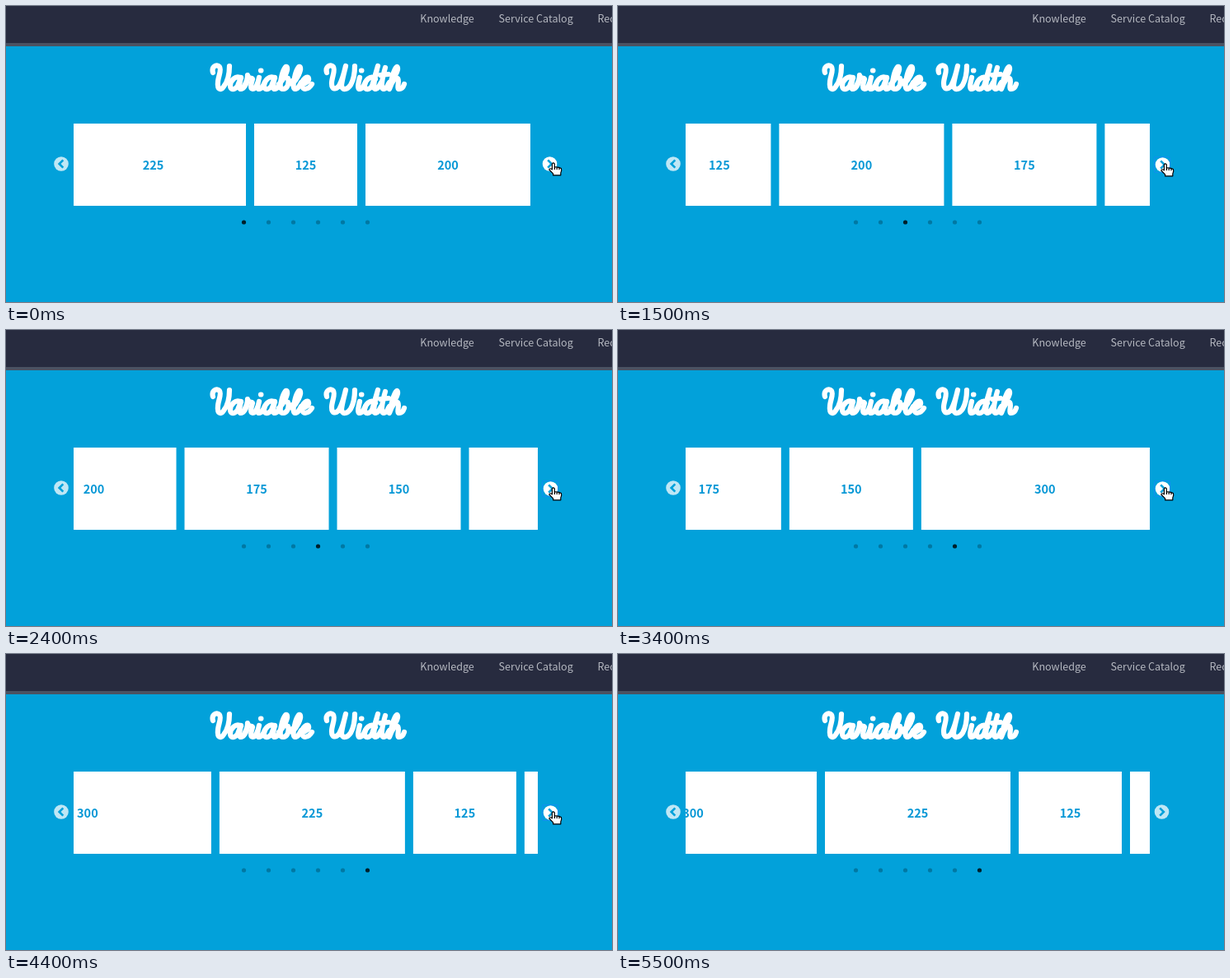
Animation of 735 by 360 pixels, one loop 5.6 s. Source, as an HTML page:

```html
<!DOCTYPE html>
<html lang="en">
<head>
<meta charset="utf-8">
<title>Variable Width</title>
<style>
  html, body { margin: 0; width: 100%; height: 100%; overflow: hidden; background: #02a1da; }
  svg { display: block; width: 735px; height: 360px; }
  text { font-family: "Noto Sans CJK JP", "Noto Sans CJK SC", "Noto Sans CJK", "Noto Sans", sans-serif; }
  .nav { font-size: 12.55px; fill: #b5b8c0; }
  .num { font-size: 14.5px; font-weight: 700; fill: #0898d6; text-anchor: middle; }
  .script { fill: none; stroke: #fff; stroke-width: 6.2; stroke-linecap: round; stroke-linejoin: round; }
  .chevron { fill: none; stroke: #02a1da; stroke-width: 2.6; }
</style>
</head>
<body>
<svg viewBox="0 0 735 360">
  <defs>
    <clipPath id="view"><rect x="82" y="143" width="563" height="100"/></clipPath>
  </defs>
  <rect width="735" height="360" fill="#02a1da"/>
  <rect width="735" height="45" fill="#272b3f"/>
  <rect y="45" width="735" height="4" fill="#4b5262"/>
  <text class="nav" x="502.3" y="20">Knowledge</text>
  <text class="nav" x="597.6" y="20">Service Catalog</text>
  <text class="nav" x="717.5" y="20">Recent</text>
  <g id="title" class="script" role="img" aria-label="Variable Width"></g>
  <g clip-path="url(#view)"><g id="track"></g></g>
  <g id="dots"></g>
  <g transform="translate(67 192)" opacity=".75">
    <circle r="8.8" fill="#fff"/>
    <path class="chevron" d="M2.3 -4.7L-2.4 0L2.3 4.7"/>
  </g>
  <g id="next">
    <circle r="8.8" fill="#fff"/>
    <path class="chevron" d="M-2.3 -4.7L2.4 0L-2.3 4.7"/>
  </g>
  <rect id="ring" x="650.5" y="183.5" width="19" height="19" rx="1.5" fill="none" stroke="#1090f0"/>
  <g id="hand" fill="#fff" stroke="#000" stroke-width="1.2" stroke-linejoin="round">
    <path d="M4.4 1.8Q5.8 .1 7.3 1.8V6Q12.5 5.6 15.4 7.6Q16.4 10 14.8 13V15.8H5.6V13.8L.8 9Q1.2 6.6 4.4 8.8Z"/>
    <path fill="none" d="M7.4 5.5V9M10.2 6.2V9M13 6.8V9.2"/>
  </g>
  <path id="pointer" d="M.5 .5V15.5L4 12.2L6.4 17.6L8.8 16.6L6.5 11.4H11.3Z" fill="#fff" stroke="#000"/>
</svg>
<script>
const LOOP = 5600, CENTER = 363.5, GAP = 10;
const $ = id => document.getElementById(id);

function add(parent, name, attrs, text) {
  const el = document.createElementNS("http://www.w3.org/2000/svg", name);
  for (const key in attrs) el.setAttribute(key, attrs[key]);
  if (text) el.textContent = text;
  parent.appendChild(el);
  return el;
}

// Hand lettering: pen strokes relative to the left end of the baseline
const glyphs = {
  V: "M2 -20C0 -27 6 -31 10 -27C13 -23 8 -15 8 -8C7 1 12 2 15 -3C20 -9 22 -19 22 -28",
  W: "M2 -20C0 -27 6 -31 10 -27C13 -23 8 -14 8 -7C8 1 13 1 17 -4C21 -11 23 -19 25 -28C22 -16 20 -8 20 -4C21 2 27 1 31 -5C35 -12 36 -20 36 -28",
  a: "M15 -13C9 -18 2 -10 2 -4C2 2 8 1 11 -4L15 -14C13 -6 12 0 15 0C18 0 20 -4 22 -8",
  r: "M2 -4C5 -9 6 -13 6 -17C7 -12 12 -14 12 -12C10 -6 9 0 12 0C15 0 17 -4 18 -7",
  i: "M5 -14C3 -6 2 0 5 0C8 0 10 -4 12 -8M7 -22.5h.4",
  b: "M2 -6C8 -12 13 -22 12 -26C11 -30 7 -24 5 -14C3 -5 3 0 7 0C12 0 15 -7 13 -13C13 -9 16 -9 19 -10",
  l: "M2 -6C8 -12 13 -22 12 -26C11 -30 7 -24 5 -14C3 -5 3 0 6 0C9 0 11 -4 13 -8",
  e: "M3 -6C8 -7 12 -10 11 -13C10 -17 3 -12 3 -5C3 2 11 1 15 -6",
  d: "M15 -12C9 -18 2 -10 2 -4C2 2 8 1 11 -4L18 -28M17 -24C13 -8 12 0 15 0C18 0 20 -4 22 -8",
  t: "M9 -26C5 -12 3 0 7 0C10 0 12 -4 14 -8M3 -17L13 -18",
  h: "M2 -6C8 -12 14 -22 13 -26C12 -30 8 -22 6 -13L3 0C6 -9 10 -15 13 -13C16 -11 11 0 15 0C18 0 20 -3 21 -6"
};
const pens = [249, 270, 287, 302, 311, 329, 345, 356, 0, 387, 424, 433, 451, 462];
[..."Variable Width"].forEach((ch, i) => {
  if (glyphs[ch]) add($("title"), "path", { d: glyphs[ch], transform: `translate(${pens[i]} 101)` });
});

const widths = [225, 125, 200, 175, 150, 300, 225, 125, 200];
const mids = [];
let left = 0;
for (const w of widths) {
  mids.push(left + w / 2);
  add($("track"), "rect", { x: left, y: 143, width: w, height: 100, fill: "#fff" });
  add($("track"), "text", { class: "num", x: left + w / 2, y: 199 }, String(w));
  left += w + GAP;
}

const dots = Array.from({ length: 6 }, (_, i) =>
  add($("dots"), "circle", { cx: 288.5 + 30 * i, cy: 263, r: 2.6 }));

// CSS "ease": cubic-bezier(.25, .1, .25, 1)
function ease(x) {
  if (x <= 0) return 0;
  if (x >= 1) return 1;
  const curve = (a, b, s) => 3 * a * s * (1 - s) ** 2 + 3 * b * s * s * (1 - s) + s ** 3;
  let lo = 0, hi = 1;
  for (let i = 0; i < 24; i++) {
    const s = (lo + hi) / 2;
    if (curve(.25, .25, s) < x) lo = s; else hi = s;
  }
  return curve(.1, 1, lo);
}

// Each slide change: start and time by which it has settled
const moves = [[536, 900], [1433.5, 1800], [2333.5, 2800], [3333.7, 3600], [4165, 4500]];
const SPEED = 300;

function place(el, x, y) {
  el.setAttribute("transform", `translate(${x} ${y})`);
}
function show(el, on) {
  el.setAttribute("visibility", on ? "visible" : "hidden");
}

function render(ms) {
  // The screen refreshes every 100 ms, with one longer stall
  let t = Math.floor(ms / 100) * 100;
  if (t >= 2400 && t < 2800) t = 2400;

  let pos = mids[1], active = 0;
  moves.forEach(([start, end], i) => {
    if (t < start) return;
    const p = t >= end ? 1 : ease((t - start) / SPEED);
    pos = mids[i + 1] + (mids[i + 2] - mids[i + 1]) * p;
    active = i + 1;
  });
  place($("track"), CENTER - pos, 0);
  dots.forEach((dot, i) => dot.setAttribute("opacity", i === active ? .8 : .25));

  const focused = t >= 500 && t < 5500;
  place($("next"), focused ? 660.5 : 659.5, focused ? 193 : 192);
  $("next").setAttribute("opacity", t < 5500 ? 1 : .75);
  show($("ring"), focused);

  show($("hand"), t < 4800);
  place($("hand"), 658, t < 100 ? 190 : t < 4700 ? 191 : 184);
  show($("pointer"), t >= 4800 && t < 5000);
  const up = (t - 4800) / 100;
  place($("pointer"), 656 - 12 * up, 115 - 102 * up);
}

const origin = performance.now();
function tick() {
  render((performance.now() - origin) % LOOP);
  requestAnimationFrame(tick);
}
tick();
</script>
</body>
</html>
```
